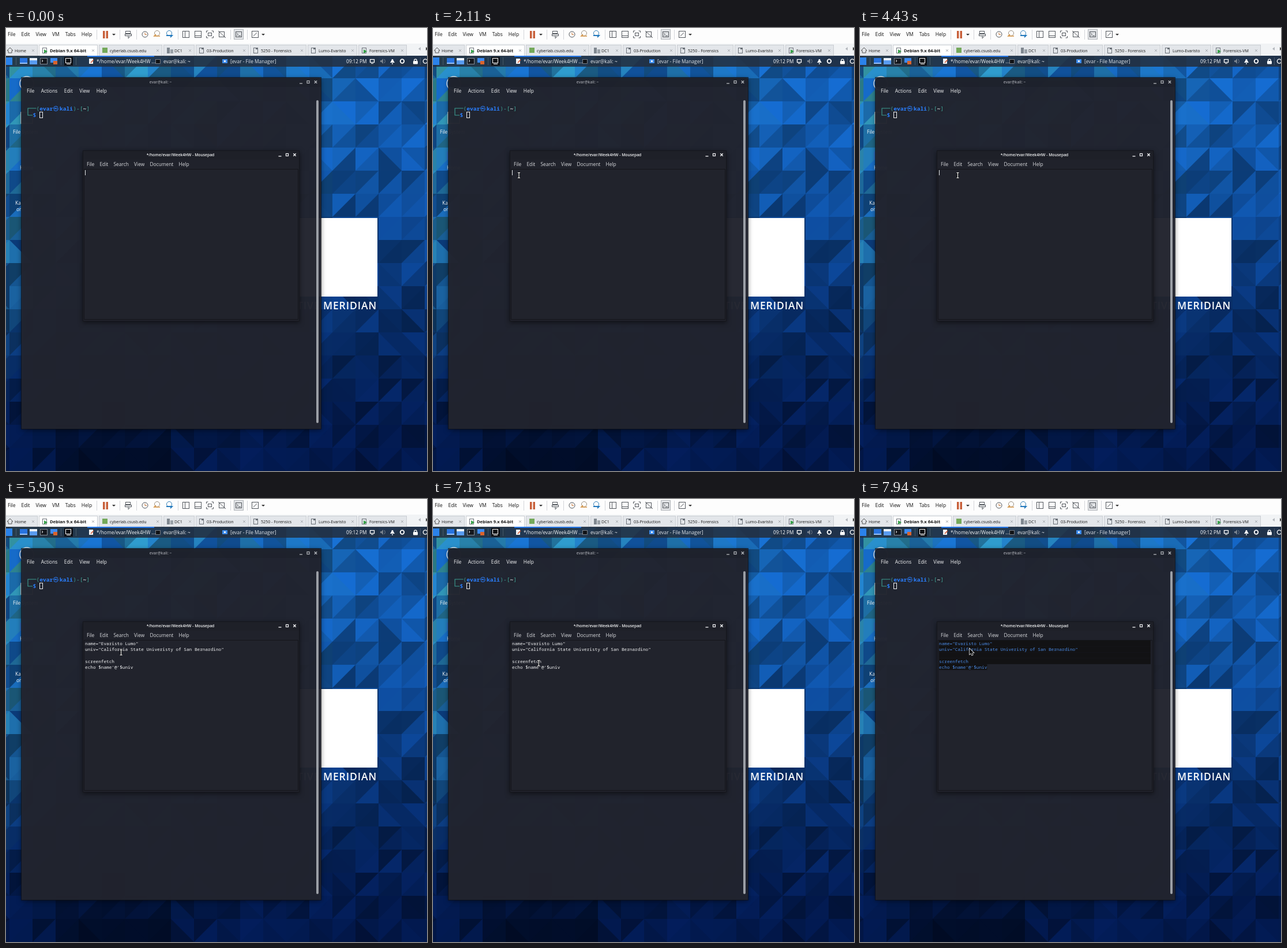
Write an HTML page with a canvas that moves like this. It is 730 px wide and 767 px high and loops after 8 s.

```html
<!DOCTYPE html>
<html lang="en">
<head>
<meta charset="utf-8">
<title>Desktop session</title>
<style>
html, body { margin: 0; width: 100%; height: 100%; overflow: hidden; background: #06245c; }
canvas { display: block; width: 730px; height: 767px; }
</style>
</head>
<body>
<canvas id="stage" width="730" height="767"></canvas>
<script>
const W = 730, H = 767, LOOP = 8000;
const UI = '"Open Sans", "Noto Sans", sans-serif';
const MONO = '"Noto Sans Mono", "DejaVu Sans Mono", monospace';
const stage = document.getElementById('stage').getContext('2d');
const desk = document.createElement('canvas');
desk.width = W;
desk.height = H;
let g = desk.getContext('2d');

const lerp = (a, b, k) => a + (b - a) * k;
const clamp = (v, lo, hi) => Math.max(lo, Math.min(hi, v));
const smooth = k => k * k * (3 - 2 * k);
const mix = (a, b, k) => a.map((v, i) => lerp(v, b[i], k));

function rect(x, y, w, h, fill) {
  g.fillStyle = fill;
  g.fillRect(x, y, w, h);
}
function frame(x, y, w, h, color, lw = 1) {
  g.strokeStyle = color;
  g.lineWidth = lw;
  g.strokeRect(x, y, w, h);
}
function round(x, y, w, h, r, fill) {
  g.fillStyle = fill;
  g.beginPath();
  g.roundRect(x, y, w, h, r);
  g.fill();
}
function poly(pts, fill, stroke, lw = 1) {
  g.beginPath();
  pts.forEach(([x, y]) => g.lineTo(x, y));
  g.closePath();
  if (stroke) { g.strokeStyle = stroke; g.lineWidth = lw; g.stroke(); }
  if (fill) { g.fillStyle = fill; g.fill(); }
}
function line(pts, color, lw = 1) {
  g.strokeStyle = color;
  g.lineWidth = lw;
  g.beginPath();
  pts.forEach(([x, y]) => g.lineTo(x, y));
  g.stroke();
}
function ring(x, y, r, color, lw = 1) {
  g.strokeStyle = color;
  g.lineWidth = lw;
  g.beginPath();
  g.arc(x, y, r, 0, 7);
  g.stroke();
}
function cross(x, y, r, color, lw) {
  line([[x - r, y - r], [x + r, y + r]], color, lw);
  line([[x + r, y - r], [x - r, y + r]], color, lw);
}
function text(s, x, y, size, color, weight = 400, family = UI, align = 'left') {
  g.font = `${weight} ${size}px ${family}`;
  g.fillStyle = color;
  g.textAlign = align;
  g.fillText(s, x, y);
}
function menu(items, x, y, gap, size, color) {
  for (const s of items.split(' ')) {
    text(s, x, y, size, color);
    x += g.measureText(s).width + gap;
  }
}
const caretDown = (x, y) => poly([[x - 3, y], [x + 3, y], [x, y + 3]], '#333');

// Wallpaper: 40 px cells, each split along a diagonal
function wallpaper() {
  let seed = 41;
  const rnd = () => (seed = (seed * 16807) % 2147483647) / 2147483647;
  const tone = (x, y) => {
    const k = clamp((y - 67) / 700, 0, 1);
    const teal = Math.max(0, 1 - x / 640) * Math.max(0, 1 - y / 620);
    const base = mix([18, 92, 178], [2, 24, 76], smooth(k));
    const shadow = 1 - .75 * k ** 6 * Math.exp(-(((x - 170) / 100) ** 2));
    const light = (.7 + rnd() * .5) * shadow;
    const c = mix(base, [58, 165, 175], teal * rnd() * 1.1);
    return `rgb(${c.map(v => Math.round(v * light))})`;
  };
  for (let y = 7; y < H; y += 40) {
    for (let x = -34; x < W; x += 40) {
      const r = x + 40, b = y + 40;
      rect(x, y, 41, 41, tone(x, y));
      const corner = rnd() < .68 ? [r, y] : [x, y];
      poly([corner, [r, b], [x, b]], tone(x, y));
    }
  }
  rect(508, 329, 136, 136, '#fff');
  g.letterSpacing = '0.9px';
  text('BY ATTENTIVE MERIDIAN', 643, 487, 17.5, '#fff', 600, UI, 'right');
  g.letterSpacing = '0px';
}

function deskIcons() {
  ring(36, 96, 12, '#e8edf2', 1.5);
  frame(26, 146, 20, 19, '#e8edf2', 1.5);
  rect(24, 214, 22, 14, '#2f6fc0');
  text('File System', 12, 183, 8.4, '#fff');
  text('Home', 24, 245, 8.4, '#fff');
  text('Ka', 16, 306, 8.4, '#fff');
  text('or', 18, 317, 8.4, '#fff');
}

function toolbar() {
  rect(0, 0, W, 27, '#fdfdfd');
  menu('File Edit View VM Tabs Help', 3, 14, 10, 8.5, '#111');
  rect(168, 5, 3.5, 13, '#c8603a');
  rect(173.5, 5, 3.5, 13, '#c8603a');
  caretDown(187, 10);
  caretDown(446, 10);
  for (const x of [157, 197, 226, 298, 389, 418]) rect(x, 3, 1, 17, '#d4d6da');
  const ink = '#51565c';
  frame(207.5, 5.5, 8, 4, ink);
  frame(206.5, 10.5, 11, 3, ink);
  line([[212, 14], [212, 18], [215, 15]], ink);
  ring(241, 11, 5, ink);
  line([[241, 8], [241, 11.5], [244, 11.5]], '#c8783a');
  ring(262, 9, 4.5, '#9a8f80');
  line([[267, 14], [257, 14], [260, 11]], '#d59445', 1.6);
  ring(283, 9, 4.5, '#3480b8');
  line([[278, 13], [288, 13], [285, 16]], '#2379bd', 1.8);
  for (const x of [306.5, 327.5, 426.5]) frame(x, 5.5, 11, 11, ink);
  line([[310.5, 5], [310.5, 17]], ink);
  line([[327, 13.5], [339, 13.5]], ink);
  line([[429, 14], [435, 8]], ink);
  for (const sx of [-1, 1]) {
    for (const sy of [-1, 1]) {
      const x = 353.5 + sx * 6, y = 11 + sy * 6;
      line([[x - sx * 3, y], [x, y], [x, y - sy * 3]], ink);
    }
  }
  frame(350.5, 8.5, 6, 5, ink);
  frame(369.5, 6.5, 9, 9, ink);
  line([[368, 5], [381, 17]], ink);
  rect(395, 2, 17, 18, '#e2e4e7');
  frame(395.5, 2.5, 16, 17, '#aeb2b7');
  frame(398.5, 6.5, 10, 9, ink);
  line([[400, 8.5], [402.5, 11], [400, 13.5]], ink);
  line([[403, 13.5], [407, 13.5]], ink);
}

const TABS = [
  ['Home', -4, 'home'], ['Debian 9.x 64-bit', 57, 'run'], ['cyberlab.csusb.edu', 161, 'host'],
  ['DC1', 273, 'rack'], ['03-Production', 329, 'page'], ['5250 - Forensics', 423, 'page'],
  ['Lumo-Evaristo', 523, 'page'], ['Forensics-VM', 611, 'run']
];
function tabIcon(kind, x) {
  if (kind === 'home') {
    poly([[x, 39], [x + 5, 34], [x + 10, 39], [x + 8, 39], [x + 8, 43], [x + 2, 43], [x + 2, 39]], null, '#555');
  } else if (kind === 'host') {
    rect(x, 34, 9, 9, '#74a95a');
  } else if (kind === 'rack') {
    rect(x, 34, 5, 10, '#7f878f');
    rect(x + 6, 37, 5, 7, '#9aa1a8');
  } else {
    frame(x + .5, 34.5, 7, 9, '#6b7178');
    if (kind === 'run') poly([[x + 3, 37], [x + 9, 40.5], [x + 3, 44]], '#35a047');
    else rect(x + 4, 34, 3, 3, '#6b7178');
  }
}
function tabBar() {
  rect(0, 27, W, 21, '#f1f3f5');
  TABS.forEach(([name, x, icon], i) => {
    const on = i === 1;
    const end = i < TABS.length - 1 ? TABS[i + 1][1] - 2 : 695;
    rect(x, 29, end - x, 19, on ? '#fff' : '#e3e6ea');
    frame(x + .5, 29.5, end - x - 1, 19, '#c9cdd2');
    text(name, x + 19, 41.5, on ? 7.6 : 7.1, '#161616', on ? 700 : 400);
    cross(end - 8, 39, 2, '#a5a9ae', .9);
    tabIcon(icon, x + 6);
  });
  poly([[719, 33], [719, 39], [715, 36]], '#b3b7bc');
  poly([[728, 33], [728, 39], [732, 36]], '#444');
}

function panel() {
  rect(0, 48, W, 19, 'rgba(35,46,61,.86)');
  rect(141, 48, 116, 2, '#2678e8');
  rect(0, 51, 11, 13, '#2b82ea');
  for (const x of [17, 95, 121, 718]) rect(x, 51, 1, 13, 'rgba(255,255,255,.16)');
  rect(24, 52, 13, 10, '#2873df');
  rect(24, 60, 13, 2, '#9bc4ff');
  rect(41, 52, 13, 4, '#e9f0f8');
  rect(41, 56, 13, 7, '#5a9cf0');
  rect(59, 52, 13, 11, '#14171d');
  frame(59.5, 52.5, 12, 10, '#858b94');
  line([[62, 55], [64, 57], [62, 59]], '#fff');
  rect(77, 52, 12, 8, '#3d8af0');
  rect(82, 57, 7, 6, '#d9632d');
  rect(101, 50, 15, 15, '#0d1015');
  frame(103.5, 52.5, 9, 8, '#fff');
  rect(105, 62, 7, 1, '#fff');
  rect(144, 53, 7, 9, '#f0f1f2');
  line([[147, 60], [152, 55]], '#d6522d', 1.5);
  rect(259, 54, 9, 8, '#101216');
  frame(259.5, 54.5, 8, 7, '#8f959d', .8);
  rect(375, 54, 9, 7, '#3d8bea');
  rect(378, 56, 3, 3, '#e5eefb');
  text('*/home/evar/Week4HW ...', 157, 60.5, 8.4, '#f3f5f7');
  text('evar@kali: ~', 273, 60.5, 8.4, '#e7eaee');
  text('[evar - File Manager]', 389, 60.5, 8.4, '#dfe4ea');
  text('09:12 PM', 590, 60.5, 8.2, '#fff');
  frame(631.5, 54.5, 7, 5, '#fff', 1.3);
  rect(633, 61, 4, 1, '#fff');
  poly([[649, 56], [651, 56], [654, 53], [654, 62], [651, 59], [649, 59]], '#75808d');
  line([[656, 54], [657.5, 57.5], [656, 61]], '#75808d');
  poly([[666, 60], [668, 57], [669, 54], [671, 54], [672, 57], [674, 60]], '#fff');
  rect(669, 61, 2, 1.5, '#fff');
  ring(687, 57.5, 3.3, '#fff', 1.8);
  round(706, 57, 8, 5.5, 1, '#fff');
  ring(710, 56, 2.2, '#fff', 1.2);
  ring(727, 57.5, 3.6, '#fff', 1.4);
}

function windowButtons(right, y, color) {
  line([[right - 28, y + 2.5], [right - 23, y + 2.5]], color, 1.3);
  frame(right - 15, y - 2, 4, 4, color, 1.2);
  cross(right, y, 2.2, color, 1.3);
}
function shadowed(x, y, w, h, fill) {
  g.save();
  g.shadowColor = 'rgba(0,0,0,.55)';
  g.shadowBlur = 9;
  g.shadowOffsetY = 2;
  round(x, y, w, h, [3, 3, 0, 0], fill);
  g.restore();
}

function terminal() {
  shadowed(27, 86, 519, 608, 'rgba(34,37,47,.94)');
  rect(27, 86, 519, 16, 'rgba(29,31,40,.55)');
  frame(26.5, 85.5, 520, 609, 'rgba(14,16,22,.7)');
  text('evar@kali: ~', 268, 96, 6.6, '#9a9da4', 600, UI, 'center');
  windowButtons(537, 93.5, '#b4b7bc');
  menu('File Actions Edit View Help', 36, 112, 11.5, 8.4, '#f4f5f6');
  const teal = '#3d9e92', blue = '#2a7fff';
  const put = (s, col, y, color, weight = 700) => text(s, 35 + col * 5.8, y, 9.65, color, weight, MONO);
  line([[52.5, 139], [38, 139], [38, 151], [46, 151]], teal, 1.1);
  put('(', 3, 142.5, teal, 400);
  put('evar', 4, 142.5, blue);
  text('㉿', 81.7, 142.5, 9.4, blue, 700, '"Noto Sans CJK KR", "Noto Sans CJK", sans-serif');
  put('kali', 10, 142.5, blue);
  put(')-[', 14, 142.5, teal, 400);
  put('~', 17, 142.5, '#fff');
  put(']', 18, 142.5, teal, 400);
  put('$', 2, 154, blue);
  frame(58.5, 145.5, 5, 10, '#f0f1f2');
  round(538, 125, 4, 559, 2, '#9b9fa6');
}

function editor() {
  shadowed(133, 212, 376, 296, '#20222b');
  rect(133, 213, 376, 15, '#1e2028');
  frame(133.5, 212.5, 375, 295, '#15161c');
  text('*/home/evar/Week4HW - Mousepad', 302.5, 222.3, 6.75, '#f2f3f4', 600, UI, 'center');
  windowButtons(500.5, 219.5, '#f5f6f7');
  menu('File Edit Search View Document Help', 140, 239, 9.2, 8.4, '#d9dbde');
  rect(135, 245, 372, 260, '#21232c');
  frame(135.5, 244.5, 371, 260, '#14151a');
}

// Pointer moves: start, end, steps, end point, optional curve control point
const HOME = [674, 760];
const MOVES = [
  [260, 1020, 12, [147, 283], [190, 10]],
  [1170, 1840, 10, [149, 259], [178, 274]],
  [2040, 2110, 2, [149, 255]],
  [2970, 3050, 2, [154, 253]],
  [3380, 3910, 2, [155, 254]],
  [4060, 4430, 6, [169.5, 255]],
  [5040, 5090, 2, [172, 258]],
  [5900, 6640, 12, [228, 298], [350, 306]],
  [6720, 7510, 12, [139, 247], [183, 296]],
  [7730, 7940, 4, [190, 259]]
];
const DRAG = MOVES[8];

function pointerAt(t) {
  let from = HOME;
  for (const [start, end, steps, to, bend] of MOVES) {
    if (t < start) break;
    if (t >= end) { from = to; continue; }
    const k = (1 + Math.floor((t - start) / (end - start) * (steps - 1))) / steps;
    const via = bend || mix(from, to, .5);
    return mix(mix(from, via, k), mix(via, to, k), k);
  }
  return from;
}

const LINES = [
  'name="Evaristo Lumo"',
  'univ="California State Univeristy of San Bernardino"',
  '', 'screenfetch', "echo $name'@'$univ"
];
const LEFT = 137, TOP = 245, PITCH = 10.2, PASTE = 5420, SELECT = 7100;

// The highlight starts late and catches up with the drag
function selectionStart(t, adv) {
  const k = Math.min(1, (t - SELECT) / (DRAG[1] - SELECT));
  const [x, y] = pointerAt(lerp(DRAG[0], DRAG[1], k));
  const row = clamp(Math.floor((y - TOP) / PITCH), 0, LINES.length - 1);
  return [row, clamp(Math.floor((x - LEFT) / adv), 0, LINES[row].length)];
}
function script(t) {
  if (t < PASTE) return rect(LEFT, 246, 1, 9, '#e4e6e8');
  const put = (s, x, y, color) => text(s, x, y + 8, 7.73, color, 500, MONO);
  LINES.forEach((s, i) => put(s, LEFT, TOP + i * PITCH, '#f1f2f3'));
  if (t < SELECT) return;
  const adv = g.measureText('0').width;
  const [row, col] = selectionStart(t, adv);
  for (let i = row; i < LINES.length; i++) {
    const s = LINES[i], c = i === row ? col : 0;
    const x = LEFT + c * adv, y = TOP + i * PITCH;
    const end = i < LINES.length - 1 ? 504 : LEFT + s.length * adv;
    rect(x, y, end - x, PITCH + .1, '#121214');
    put(s.slice(c), x, y, '#4b8be6');
  }
}

function arrow() {
  poly([[0, 0], [0, 10], [2.3, 8], [4, 11.5], [5.7, 10.7], [4.1, 7.4], [7.2, 7.2]], '#0b0b0c', '#fff', 1.4);
}
function beam() {
  for (const [c, lw] of [['#111', 2.6], ['#fff', 1.1]]) {
    line([[-2, -4.5], [2, -4.5]], c, lw);
    line([[0, -4.5], [0, 4.5]], c, lw);
    line([[-2, 4.5], [2, 4.5]], c, lw);
  }
}
function hand() {
  round(-2.4, -6, 2.4, 9, 1.2, '#fff');
  round(-2.4, -1.5, 7, 6.5, 1.8, '#fff');
  poly([[-4, -.5], [-2, 0], [1, 5], [-1, 5]], '#fff');
  rect(-.8, 4, 4.8, 2.8, '#fff');
}
function pointer(t) {
  if (t < 70) return;
  g.save();
  g.translate(...pointerAt(t));
  if (t < 1020 || t >= 7730) arrow();
  else if (t < 1170) hand();
  else beam();
  g.restore();
}

wallpaper();
deskIcons();
terminal();
editor();
toolbar();
tabBar();
panel();
g = stage;

let begin;
function tick(now) {
  begin ??= now;
  const t = (now - begin) % LOOP;
  g.drawImage(desk, 0, 0);
  script(t);
  pointer(t);
  requestAnimationFrame(tick);
}
requestAnimationFrame(tick);
</script>
</body>
</html>
```
